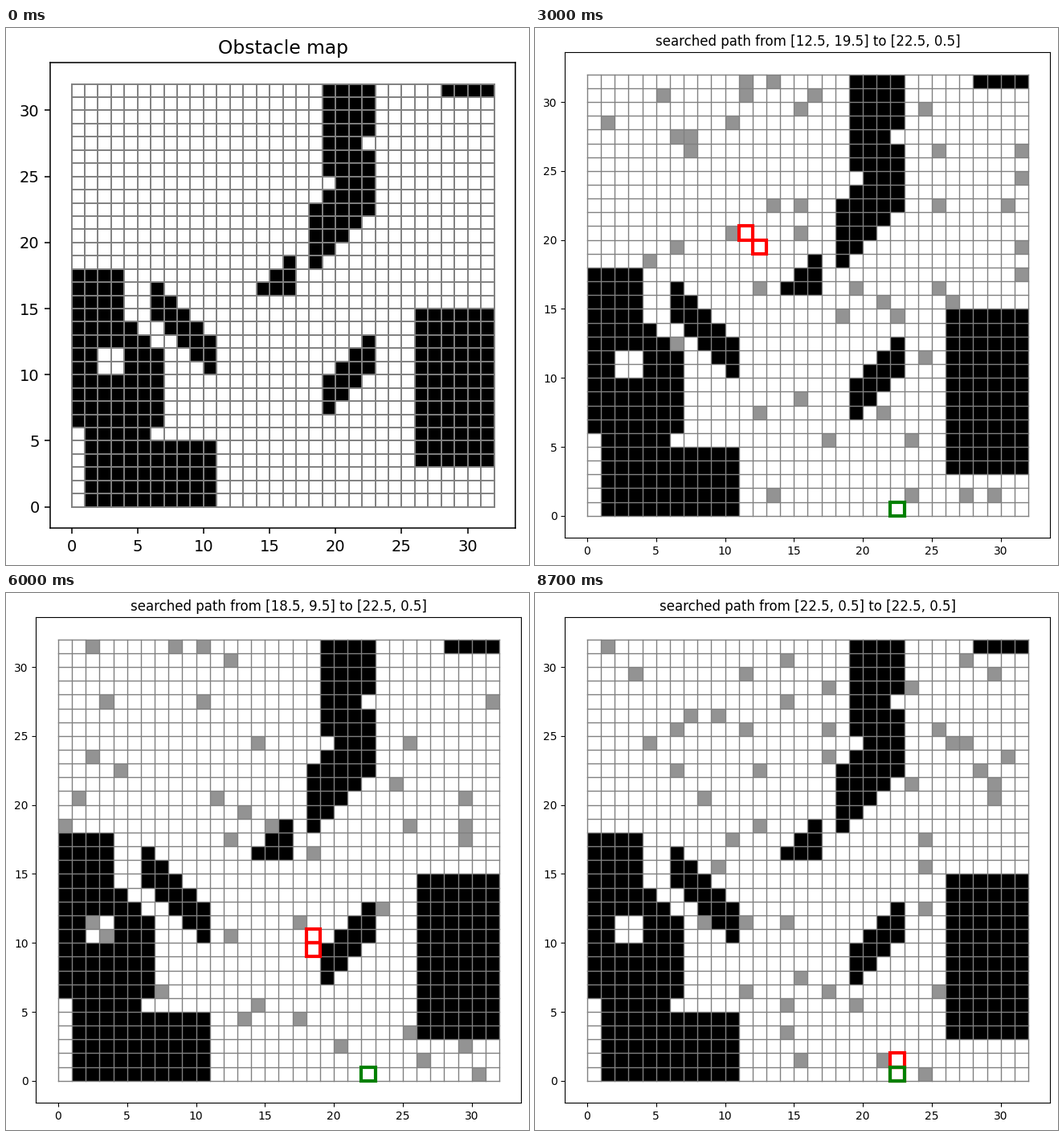
A matplotlib script for the animation above (9 s loop, 651x668 px).

```python
import numpy as np
import matplotlib.pyplot as plt
from matplotlib.animation import FuncAnimation
from matplotlib.colors import ListedColormap
from matplotlib.patches import Rectangle

W, H, DPI = 651, 668, 100
N, FRAMES, STEP_MS = 32, 30, 300
GOAL = (22, 0)
FREE, WALL, LOOSE = 0, 1, 2
CMAP = ListedColormap(["white", "black", "#939393"])

# Steps on which the robot moves straight down instead of diagonally
STRAIGHT = (9, 12, 13, 19, 20, 21, 22, 23, 28, 29)


def wall_map():
    g = np.zeros((N, N), int)

    def block(x0, x1, y0, y1, value=WALL):
        g[y0:y1 + 1, x0:x1 + 1] = value

    def rows(y, *spans):
        for i, (x0, x1) in enumerate(spans):
            block(x0, x1, y + i, y + i)

    block(1, 10, 0, 4)
    block(1, 5, 5, 5)
    block(0, 6, 6, 11)
    block(2, 3, 10, 11, FREE)
    rows(12, (0, 5), (0, 4))
    block(0, 3, 14, 17)
    rows(10, (10, 10), (9, 10), (8, 10), (7, 9), (6, 8), (6, 7), (6, 6))
    rows(16, (14, 16), (15, 16), (16, 16))
    rows(18, (18, 18), (18, 19), (18, 20), (18, 21), (18, 22))
    block(19, 22, 23, 31)
    g[24, 19] = g[27, 22] = FREE
    rows(7, (19, 19), (19, 20), (19, 21), (20, 22), (21, 22), (22, 22))
    block(26, 31, 3, 14)
    block(28, 31, 31, 31)
    return g


def robot(k):
    return 3 + k - sum(s <= k for s in STRAIGHT), 29 - k


def scatter(k):
    """Wall map with fresh loose obstacles for step k."""
    g = WALLS.copy()
    rng = np.random.default_rng(100 + k)
    for i in rng.integers(0, N * N, 60):
        y, x = divmod(int(i), N)
        if g[y, x] == FREE and (x, y) not in (robot(k), robot(k - 1)):
            g[y, x] = LOOSE
    return g


def make_axes(left, top, size, scale):
    ax = fig.add_axes([left / W, 1 - (top + size) / H, size / W, size / H])
    mesh = ax.pcolormesh(np.arange(N + 1), np.arange(N + 1), WALLS,
                         cmap=CMAP, vmin=0, vmax=2)
    lines = dict(colors="gray", linewidths=scale, capstyle="projecting",
                 zorder=2)
    ax.hlines(np.arange(N + 1), 0, N, **lines)
    ax.vlines(np.arange(N + 1), 0, N, **lines)
    ax.set(xlim=(-1.6, 33.6), ylim=(-1.6, 33.6),
           xticks=range(0, 31, 5), yticks=range(0, 31, 5))
    ax.tick_params(length=3.5 * scale, width=0.8 * scale,
                   pad=3.5 * scale, labelsize=10 * scale)
    for spine in ax.spines.values():
        spine.set_linewidth(0.8 * scale)
    title = ax.set_title(" ", fontsize=12 * scale, pad=6 * scale)
    return ax, mesh, title


def add_box(color, cell=(0, 0)):
    return run_ax.add_patch(Rectangle(cell, 1, 1, fill=False, ec=color,
                                      lw=3, zorder=4))


plt.rcParams["font.family"] = "DejaVu Sans"
WALLS = wall_map()
fig = plt.figure(figsize=(W / DPI, H / DPI), dpi=DPI, facecolor="white")
map_ax, _, map_title = make_axes(55.2, 43.3, 578.6, 1.4)
map_title.set_text("Obstacle map")
run_ax, run_mesh, run_title = make_axes(37.48, 30.27, 604, 1)
last_box = add_box("red")
here_box = add_box("red")
add_box("green", GOAL)


def update(k):
    map_ax.set_visible(k == 0)
    run_ax.set_visible(k > 0)
    if k == 0:
        return
    x, y = robot(k)
    run_mesh.set_array(scatter(k))
    here_box.set_xy((x, y))
    last_box.set_xy(robot(k - 1))
    run_title.set_text(f"searched path from [{x + 0.5}, {y + 0.5}] "
                       f"to [{GOAL[0] + 0.5}, {GOAL[1] + 0.5}]")


anim = FuncAnimation(fig, update, frames=FRAMES, interval=STEP_MS,
                     init_func=lambda: update(0), repeat=True,
                     repeat_delay=0, blit=False)
plt.show()
```
